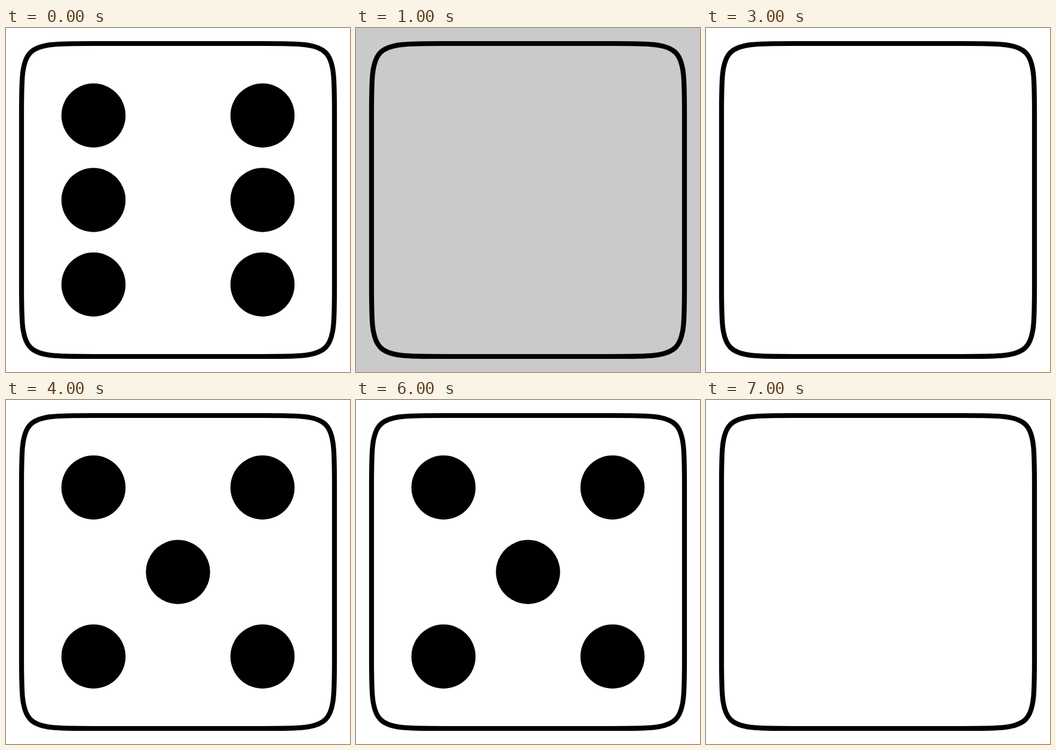
Write an HTML page that moves like this. It is 576 px wide and 576 px high and loops after 8 s.

```html
<!DOCTYPE html>
<html lang="en">
<head>
<meta charset="utf-8">
<title>Die</title>
<style>
html, body { margin: 0; width: 100%; height: 100%; overflow: hidden; background: #fff; }
svg { display: block; width: 100vw; height: 100vh; }
</style>
</head>
<body>
<svg viewBox="0 0 576 576">
  <rect id="back" width="576" height="576" fill="#fff"/>
  <path d="M146 26H430C550 26 550 26 550 146V430C550 550 550 550 430 550H146C26 550 26 550 26 430V146C26 26 26 26 146 26Z" fill="none" stroke="#000" stroke-width="8.2"/>
  <g id="pips"></g>
</svg>
<script>
const STEP = 1000, COUNT = 8;
const GAP = 141.5, MID = 288, RADIUS = 53.7;
// Grid cells are numbered 0 to 8, row by row.
const FIVE = [0, 2, 4, 6, 8], SIX = [0, 2, 3, 5, 6, 8];

const back = document.getElementById('back');
const group = document.getElementById('pips');
const pips = Array.from({ length: 9 }, (_, i) => {
  const dot = document.createElementNS('http://www.w3.org/2000/svg', 'circle');
  dot.setAttribute('cx', MID + (i % 3 - 1) * GAP);
  dot.setAttribute('cy', MID + (Math.floor(i / 3) - 1) * GAP);
  dot.setAttribute('r', RADIUS);
  group.appendChild(dot);
  return dot;
});

function faceAt(step) {
  if (step % 2) return [];
  return step === 0 ? SIX : FIVE;
}

function draw(ms) {
  const step = Math.floor(ms / STEP) % COUNT;
  const face = faceAt(step);
  back.setAttribute('fill', step === 1 ? '#cacaca' : '#fff');
  pips.forEach((dot, i) => {
    dot.style.display = face.includes(i) ? '' : 'none';
  });
}

const start = performance.now();
function tick() {
  draw(performance.now() - start);
  requestAnimationFrame(tick);
}
tick();
</script>
</body>
</html>
```
